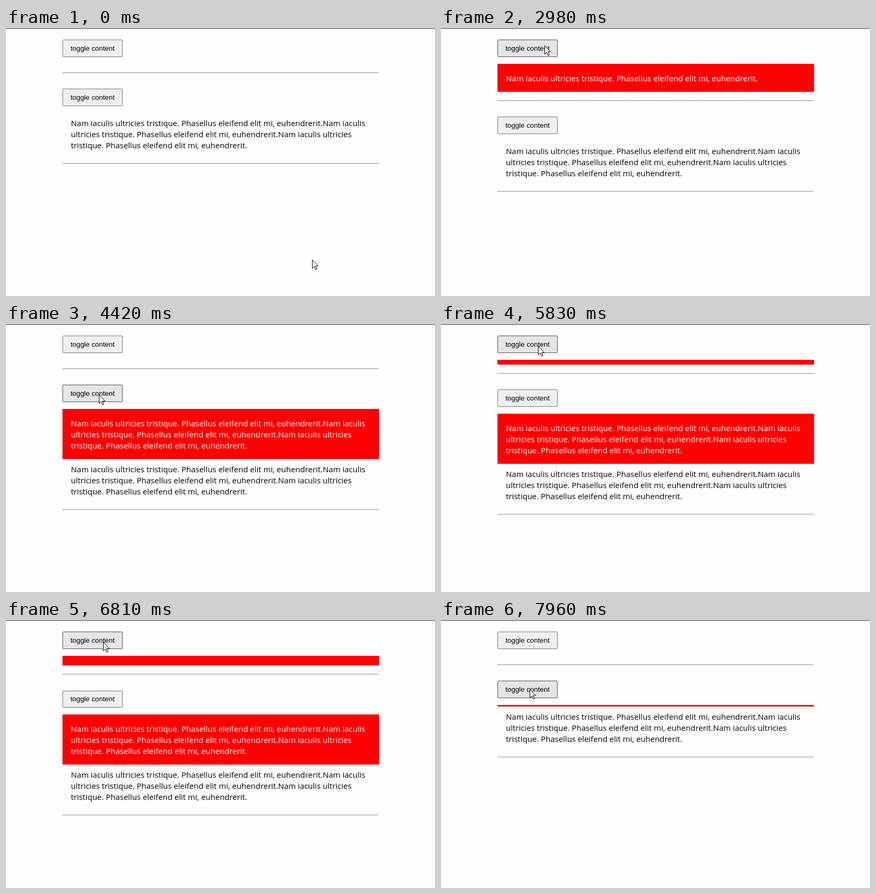
These frames come from a looping animation (813 by 508 pixels, 8000 ms). An HTML page:

```html
<!DOCTYPE html>
<html lang="en">
<head>
<meta charset="utf-8">
<title>Toggle content</title>
<style>
html, body { margin: 0; width: 100%; height: 100%; overflow: hidden; background: #fefefe; }
body { position: relative; border-top: 1px solid #222; box-sizing: border-box; }
#page { position: absolute; left: 107px; top: -1px; width: 600px; font: 15px/21px "Open Sans", sans-serif; color: #000; }
#page > * { position: absolute; left: 0; margin: 0; box-sizing: border-box; white-space: nowrap; }
button { width: 114px; padding: 0; border: 1px solid #767676; border-radius: 2px; background: #efefef; color: #000; font: 13.333px "Liberation Sans", Arial, sans-serif; }
button.hover { background: #e5e5e5; border-color: #4f4f4f; }
button.down { background: #f5f5f5; border-color: #8d8d8d; }
hr { width: 600px; }
.panel { width: 600px; overflow: hidden; background: #f00; color: #fff; }
.panel p { margin: 17px 16px; }
#page > #text { left: 16px; }
#cursor { position: absolute; left: 0; top: -1px; overflow: visible; }
</style>
</head>
<body>
<div id="page">
  <button>toggle content</button>
  <div class="panel"><p>Nam iaculis ultricies tristique. Phasellus eleifend elit mi, euhendrerit.</p></div>
  <hr>
  <button>toggle content</button>
  <div class="panel"><p class="long"></p></div>
  <p id="text" class="long"></p>
  <hr>
</div>
<svg id="cursor" width="13" height="20">
  <path d="M.5 .5V16.5L4.2 13L6.8 19L9.2 18L6.7 12.1H11.7Z" fill="#fff" stroke="#000"/>
</svg>
<script>
// The screen refreshes once per TICK ms; all other times are in ticks
const LOOP = 8000, TICK = 126, LEAD = 26;
const SLIDE = 2.61, HOLD = .8, FULL = [53, 95];
const $$ = q => [...document.querySelectorAll(q)];
const buttons = $$('button'), panels = $$('.panel'), rules = $$('hr');
const text = document.getElementById('text'), cursor = document.getElementById('cursor');

for (const p of $$('.long')) p.innerHTML =
  'Nam iaculis ultricies tristique. Phasellus eleifend elit mi, euhendrerit.Nam iaculis<br>' +
  'ultricies tristique. Phasellus eleifend elit mi, euhendrerit.Nam iaculis ultricies<br>' +
  'tristique. Phasellus eleifend elit mi, euhendrerit.';

// Pointer glides: start, end, x, y
const home = { x: 580, y: 439 };
const glides = [
  [0, 3, 760, 520], [4, 5, 601, 428], [5, 9, 152, 104], [9, 11, 196, 33],
  [28, 30.3, 176, 134], [41, 44, 184, 42], [57, 60, 168, 131]
];

// Mouse releases on each button; each one toggles its panel
const clicks = [[13.378, 24.75, 45.629, 53], [31.891, 61.01]];

const clamp = v => Math.min(1, Math.max(0, v));
const smooth = p => p * p * (3 - 2 * p);

// cubic-bezier(.25, .1, .25, 1)
function ease(p) {
  if (p >= 1) return 1;
  let lo = 0, hi = 1, s = 0;
  for (let i = 0; i < 24; i++) {
    s = (lo + hi) / 2;
    if (.75 * s * (1 - s) + s ** 3 < p) lo = s; else hi = s;
  }
  return .3 * s * (1 - s) ** 2 + 3 * s * s * (1 - s) + s ** 3;
}

function panelHeight(n, t) {
  const done = clicks[n].filter(up => up <= t);
  if (!done.length) return 0;
  const e = ease((t - done.at(-1)) / SLIDE);
  return FULL[n] * (done.length % 2 ? e : 1 - e);
}

function pointer(t) {
  let { x, y } = home;
  for (const [from, to, toX, toY] of glides) {
    const p = smooth(clamp((t - from) / (to - from)));
    x += (toX - x) * p;
    y += (toY - y) * p;
  }
  return [Math.round(x), Math.round(y)];
}

function place(el, top, height) {
  el.style.top = top + 'px';
  if (height !== undefined) el.style.height = height + 'px';
}

function draw(now) {
  const t = Math.floor((now % LOOP + LEAD) / TICK);
  const [x, y] = pointer(t);
  const a = panelHeight(0, t), b = panelHeight(1, t);
  const tops = [22, 115.45 + a];

  place(buttons[0], tops[0], 33);
  place(panels[0], 68, a);
  place(rules[0], 84 + a);
  place(buttons[1], tops[1], 32.5);
  place(panels[1], 161 + a, b);
  place(text, 170 + a + b);
  place(rules[1], 256 + a + b);

  buttons.forEach((button, n) => {
    const over = x >= 107 && x < 221 && y >= tops[n] && y < tops[n] + 33;
    const down = over && clicks[n].some(up => t < up && up - t < HOLD);
    button.className = down ? 'down' : over ? 'hover' : '';
  });
  cursor.style.transform = `translate(${x}px, ${y}px)`;
}

const start = performance.now();
function frame() {
  draw(performance.now() - start);
  requestAnimationFrame(frame);
}
frame();
</script>
</body>
</html>
```
